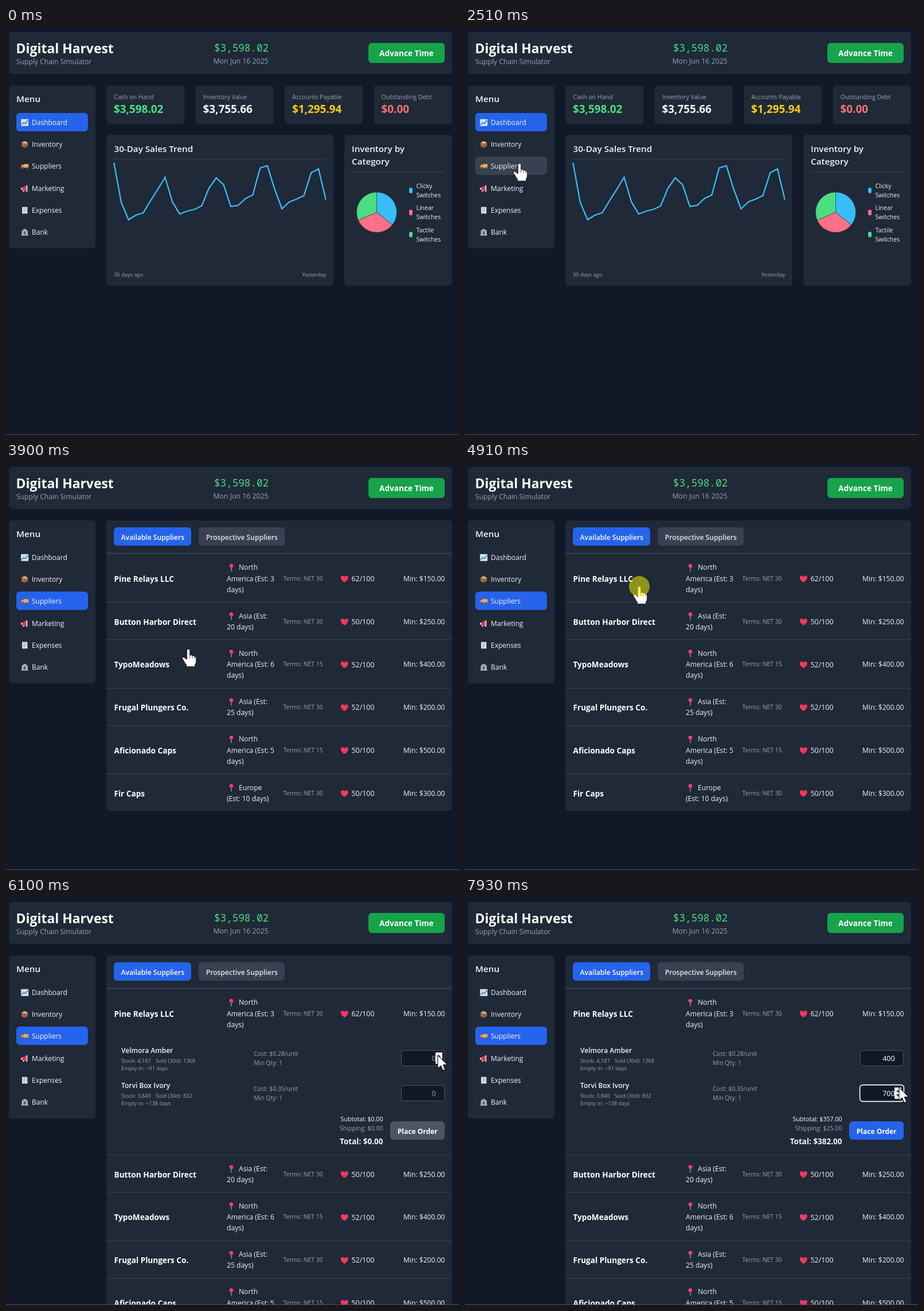
An HTML page for the animation above (7990 ms loop, 790 by 709 pixels).

```html
<!DOCTYPE html>
<html lang="en">
<head>
<meta charset="utf-8">
<title>Supply Chain Simulator</title>
<style>
html, body { margin: 0; width: 100%; height: 100%; overflow: hidden; background: #111827; }
svg { display: block; }
text { font-family: "Open Sans", "Noto Sans", sans-serif; }
.mono { font-family: "Noto Sans Mono", "DejaVu Sans Mono", monospace; }
</style>
</head>
<body>
<svg id="stage" width="790" height="709" viewBox="0 0 790 709"></svg>
<script>
const LOOP = 7990;
const CARD = '#1f2937', LINE = '#374151', GREY = '#9ca3af', LIGHT = '#f3f4f6', WHITE = '#fff', BLUE = '#2563eb',
  SKY = '#38bdf8', ROSE = '#fb7185', GREEN = '#4ade80';

// Markup helpers
const box = (x, y, w, h, fill, r = 6, extra = '') =>
  `<rect x="${x}" y="${y}" width="${w}" height="${h}" rx="${r}" fill="${fill}" ${extra}/>`;
const txt = (x, y, s, size = 12, fill = LIGHT, weight = 400, anchor = 'start', extra = '') =>
  `<text x="${x}" y="${y}" font-size="${size}" fill="${fill}" font-weight="${weight}" text-anchor="${anchor}" ${extra}>${s}</text>`;
const rule = (x1, x2, y, w = 1) => `<path d="M${x1} ${y}H${x2}" stroke="${LINE}" stroke-width="${w}"/>`;
const at = (x, y, s, scale = 1) => `<g transform="translate(${x} ${y}) scale(${scale})">${s}</g>`;
const shape = (d, fill, extra = '') => `<path d="${d}" fill="${fill}" ${extra}/>`;
const stroke = (d, color, w = 1) => `<path d="${d}" fill="none" stroke="${color}" stroke-width="${w}"/>`;

// Icons, centred on 0,0
const icons = [
  box(-7, -6.5, 14, 13, '#dfe9ef', 1) + stroke('M-7 -2H7M-7 2H7M-2 -6V6M3 -6V6', '#a9c3d1', .6) +
    stroke('M-6 4L-2 0L1 2L6 -4', '#2878b5', 1.6),
  shape('M0 -6L6 -3.5V3.5L0 6.5L-6 3.5V-3.5Z', '#a9683f') + shape('M0 -6L6 -3.5L0 -1L-6 -3.5Z', '#d39a6a') +
    shape('M0 -1L6 -3.5V3.5L0 6.5Z', '#8a5233') + stroke('M-3 -4.8L3 -2.2V1', '#ecd0ab', 1.2),
  box(-2, -4, 9, 7, '#f2b035', 1) + shape('M-7 3V0L-5 -3H-2V3Z', '#e8604c') + box(-5.4, -1.8, 2.6, 2, '#bfe3f5', 0) +
    '<circle cx="-4" cy="3.6" r="1.8" fill="#55606e"/><circle cx="4" cy="3.6" r="1.8" fill="#55606e"/>',
  shape('M-6.5 -1.5L4 -6V6L-6.5 2Z', '#e0364f') + shape('M-4 2.5L-1 3.5V6H-3.5Z', '#c3cad3') +
    shape('M3 -6H5V6H3Z', '#f3d4d8') + box(-7, -1.8, 2.5, 4, '#d7dde4', 1),
  shape('M-5 -6.5H5V6.5L3 5.5L1 6.5L-1 5.5L-3 6.5L-5 5.5Z', '#e3e6ea') +
    stroke('M-3 -4H3M-3 -1.5H3M-3 1H3M-3 3.5H1', '#8d97a5', 1),
  shape('M0 -6.5L6.5 -2.5H-6.5Z', '#b8bfc6') + box(-5.5, -2.5, 11, 7, '#8c959d', 0) +
    stroke('M-4 -2V4M4 -2V4', '#d3d8dc', 1.6) + box(-1.5, -.5, 3, 5, '#4c5965', 0) + box(-6.5, 4.3, 13, 2, '#b8bfc6', 0)
];
const pin = stroke('M0 0V7', '#9aa4b2', 1.3) + '<circle cy="-2.5" r="3.5" fill="#f0335b"/><circle cx="-1" cy="-3.6" r="1" fill="#ff8ba3"/>';
const heart = shape('M0 6C-3 4-6.5 1-6.5 -2.3C-6.5 -6.5-1.5 -6.8 0 -3.4C1.5 -6.8 6.5 -6.5 6.5 -2.3C6.5 1 3 4 0 6Z', '#f8355f');

function header() {
  return box(5, 7, 773, 73, CARD) + txt(17.6, 44, 'Digital Harvest', 22.9, WHITE, 700) +
    txt(18, 63, 'Supply Chain Simulator', 12.1, GREY) +
    txt(410.5, 40.5, '$3,598.02', 17.6, GREEN, 400, 'middle', 'class="mono"') +
    txt(409.5, 62, 'Mon Jun 16 2025', 12.3, GREY, 400, 'middle') +
    box(632, 26, 133, 35, '#16a34a') + txt(698.5, 49, 'Advance Time', 13.6, WHITE, 700, 'middle');
}

const itemY = i => Math.floor(148 + i * 38.35);

function sidebar() {
  const names = ['Dashboard', 'Inventory', 'Suppliers', 'Marketing', 'Expenses', 'Bank'];
  return box(5, 100, 151, 284, CARD) + txt(18, 129, 'Menu', 15.2, LIGHT, 600) +
    box(18, 0, 125, 32, LINE, 6, 'id="hover"') + box(18, 0, 125, 32, BLUE, 6, 'id="active"') +
    names.map((n, i) => at(32.7, itemY(i) + 16.7, icons[i], .93) + txt(45, itemY(i) + 21, n)).join('');
}

function pie(cx, cy, r) {
  const point = a => `${cx + r * Math.sin(a * Math.PI / 180)} ${cy - r * Math.cos(a * Math.PI / 180)}`;
  return [[0, 129, SKY], [129, 247, ROSE], [247, 360, GREEN]].map(([a, b, c]) =>
    shape(`M${cx} ${cy}L${point(a)}A${r} ${r} 0 0 1 ${point(b)}Z`, c, `stroke="${CARD}" stroke-width=".5"`)).join('');
}

function dashboard() {
  const cards = [['Cash on Hand', '$3,598.02', GREEN], ['Inventory Value', '$3,755.66', LIGHT],
    ['Accounts Payable', '$1,295.94', '#facc15'], ['Outstanding Debt', '$0.00', '#f87171']];
  const sales = [235, 304, 334, 326, 322, 301, 281, 260, 303, 324, 319, 316, 310, 279, 261, 273, 311, 309, 297, 291,
    244, 240, 281, 315, 303, 298, 292, 252, 245.5, 299];
  const legend = [['Clicky', SKY], ['Linear', ROSE], ['Tactile', GREEN]];
  return cards.map(([label, value, color], i) => at(175 + i * 155.5, 100, box(0, 0, 136.5, 67, CARD) +
      txt(13.3, 24, label, 10.6, GREY) + txt(13, 48.3, value, 18.9, color, 700))).join('') +
    box(175, 186, 396, 263, CARD) + txt(188.5, 216, '30-Day Sales Trend', 15.2, LIGHT, 600) + rule(188, 558, 228.5) +
    stroke('M' + sales.map((y, i) => `${188.3 + i * 12.74} ${y}`).join('L'), SKY, 2.3) +
    txt(188, 433, '30 days ago', 9.3, GREY) + txt(558.5, 433, 'Yesterday', 9.3, GREY, 400, 'end') +
    box(590, 186, 188, 263, CARD) + txt(603, 216, 'Inventory by', 15.2, LIGHT, 600) +
    txt(603, 238, 'Category', 15.2, LIGHT, 600) + rule(603, 765, 250.5) + pie(646.5, 321, 35) +
    legend.map(([n, c], i) => at(703, 283 + i * 38.4, box(0, -5, 6, 10, c, 3) +
      txt(12.5, -4, n, 10.5) + txt(12.5, 12, 'Switches', 10.5))).join('');
}

const suppliers = [
  ['Pine Relays LLC', 'North|America (Est: 3|days)', 30, 62, 150],
  ['Button Harbor Direct', 'Asia (Est:|20 days)', 30, 50, 250],
  ['TypoMeadows', 'North|America (Est: 6|days)', 15, 52, 400],
  ['Frugal Plungers Co.', 'Asia (Est:|25 days)', 30, 52, 200],
  ['Aficionado Caps', 'North|America (Est: 5|days)', 15, 50, 500],
  ['Fir Caps', 'Europe|(Est: 10 days)', 30, 50, 300]
];

function supplierRows() {
  let top = 158;
  return suppliers.map(([name, place, terms, score, min], i) => {
    const lines = place.split('|'), h = lines.length === 3 ? 84.5 : 65, mid = top + h / 2 + .5;
    const lineY = k => mid + 4.8 + (k - (lines.length - 1) / 2) * 19.2;
    const row = (i ? rule(175, 778, Math.floor(top) + .5) : '') + txt(188.5, mid + 6, name, 13.6, WHITE, 700) +
      at(393, lineY(0) - 4.5, pin) + lines.map((s, k) => txt(k ? 385 : 406, lineY(k), s, 12.1)).join('') +
      txt(483.5, mid + 4, `Terms: NET ${terms}`, 10.4, GREY) + at(590.3, mid + 1.2, heart) +
      txt(602.5, mid + 5.3, `${score}/100`, 12.4) + txt(765.5, mid + 5.2, `Min: $${min}.00`, 12.1, LIGHT, 400, 'end');
    top += h;
    return row;
  });
}

function product(i, name, stock, sold, days, cost) {
  return at(0, i * 61, txt(201, 270, name, 12, LIGHT, 600) + txt(201, 287, `Stock: ${stock}`, 9.3, GREY) +
    txt(261, 287, `Sold (30d): ${sold}`, 9.3, GREY) + txt(201, 300, `Empty in: ~${days} days`, 9.3, GREY) +
    txt(432, 275, `Cost: $${cost}/unit`, 10.5, GREY) + txt(432, 291, 'Min Qty: 1', 10.5, GREY) +
    box(689.5, 265.5, 75, 27, '#111827', 4, 'stroke="#4b5563"') +
    box(688.5, 264.5, 77, 29, 'none', 5, `id="ring${i}" stroke="#fff" stroke-width="1.4"`) +
    txt(749.5, 284, '0', 12.4, GREY, 400, 'end', `id="qty${i}"`) +
    `<g id="spin${i}">${box(749, 269, 12, 20, '#ececec', 1)}${shape('M752 277L755 273L758 277ZM752 281L755 285L758 281Z', '#444')}</g>`);
}

function details() {
  return product(0, 'Velmora Amber', '4,187', 1368, 91, '0.28') +
    product(1, 'Torvi Box Ivory', '3,840', 832, 138, '0.35') +
    txt(657.5, 389, '', 10.6, WHITE, 400, 'end', 'id="subtotal"') +
    txt(657.5, 405, '', 10.6, GREY, 400, 'end', 'id="shipping"') +
    txt(657.5, 429, '', 13.5, LIGHT, 700, 'end', 'id="total"') +
    box(670, 389, 95, 32, BLUE, 6, 'id="order"') + txt(717.7, 410.7, 'Place Order', 12, WHITE, 700, 'middle');
}

function supplierPage() {
  const [first, ...others] = supplierRows();
  return box(175, 100, 603, 506, CARD, 6, 'id="panel"') +
    box(188, 112, 135, 32, BLUE) + txt(255.8, 133.5, 'Available Suppliers', 12.1, WHITE, 600, 'middle') +
    box(336, 112, 150, 32, LINE) + txt(411.3, 133.5, 'Prospective Suppliers', 12.1, '#e5e7eb', 600, 'middle') +
    rule(175, 778, 157.5, 2) + first +
    `<svg id="drawer" y="242" width="790" height="0">${at(0, -242, details())}</svg>` +
    `<g id="others">${others.join('')}</g>`;
}

const arrow = shape('M0 0V23L5.3 18L9 26.5L12.8 24.9L9.3 16.6H16.7Z', WHITE, 'stroke="#000"');
const hand = shape('M-2.6 2.5a2.6 2.6 0 0 1 5.2 0V11q2.5-1.5 4.3.8q2.4-1 3.8 1.2q2.8-.4 2.8 3V21q0 4-2 6v3.5H-3.5V27' +
  'Q-6 25-7.5 21L-10.5 16.5Q-10.5 13-7.5 14.5L-2.6 18Z', WHITE, 'stroke="#111" stroke-width=".8"') +
  stroke('M2.7 11V16M6.9 12V16.5M10.7 13.5V17', '#333', .8);

document.getElementById('stage').innerHTML = header() + sidebar() +
  `<g id="dash">${dashboard()}</g><g id="supply">${supplierPage()}</g>` +
  '<rect y="708" width="790" height="1" fill="#4b5563"/>' +
  `<g id="cursor"><g id="arrow">${arrow}</g><g id="hand">${hand}</g><circle id="press" r="18" fill="#ff0" opacity=".5"/></g>`;

// Pointer path: time, x, y
const path = [[320, 722, 698], [1070, 622, 373], [1350, 572, 343], [1880, 179, 232], [2150, 125, 240], [2510, 95, 236],
  [3560, 95, 236], [3900, 318, 324], [4040, 320, 347], [4170, 320, 347], [4910, 304, 215], [5110, 304, 215],
  [5700, 772, 320], [5970, 757, 278], [6100, 753, 274], [6780, 753, 274], [7100, 766, 305], [7380, 757, 330],
  [LOOP, 757, 330]];
const presses = [[3100, 3230], [4840, 4980], [6310, 6710], [7650, 7930]];
const steps = [[6310, 6510, 6580, 6640], [7650, 7720, 7720, 7790, 7790, 7860, 7860]];

function pointer(t) {
  const i = Math.max(1, path.findIndex(p => p[0] > t));
  const [t0, x0, y0] = path[i - 1], [t1, x1, y1] = path[i], k = Math.max(0, (t - t0) / (t1 - t0));
  return [x0 + (x1 - x0) * k, y0 + (y1 - y0) * k];
}

const el = id => document.getElementById(id);
const show = (id, on) => el(id).setAttribute('visibility', on ? 'inherit' : 'hidden');
const set = (id, name, value) => el(id).setAttribute(name, value);
const money = n => '$' + n.toFixed(2);

function render(t) {
  const [x, y] = pointer(t), onSupply = t >= 3230;
  const open = t < 4980 ? 0 : t < 5040 ? 82 : 205;
  const item = x >= 18 && x <= 143 ? [0, 1, 2, 3, 4, 5].find(i => y >= itemY(i) && y <= itemY(i) + 32) : undefined;
  const onRow = onSupply && x >= 175 && x <= 778 && y >= 158 && y < 606 + open && !(y >= 242 && y < 242 + open);
  const pointing = item !== undefined || onRow;

  set('dash', 'display', onSupply ? 'none' : 'inline');
  set('supply', 'display', onSupply ? 'inline' : 'none');
  set('active', 'y', itemY(onSupply ? 2 : 0));
  set('hover', 'y', itemY(item || 0));
  show('hover', item !== undefined && t >= 320);

  set('panel', 'height', 506 + open);
  set('drawer', 'height', open);
  set('others', 'transform', `translate(0 ${open})`);

  const qty = steps.map(s => 100 * s.filter(time => t >= time).length);
  qty.forEach((q, i) => {
    const top = 265 + i * 61;
    el('qty' + i).textContent = q;
    set('qty' + i, 'fill', q ? WHITE : GREY);
    show('ring' + i, i ? t >= 7650 : t >= 6310 && t < 7650);
    show('spin' + i, x >= 689 && x <= 765 && y >= top && y <= top + 28);
  });
  const sub = qty[0] * .28 + qty[1] * .35, ship = sub ? 25 : 0;
  el('subtotal').textContent = 'Subtotal: ' + money(sub);
  el('shipping').textContent = 'Shipping: ' + money(ship);
  el('total').textContent = 'Total: ' + money(sub + ship);
  set('order', 'fill', sub >= 150 ? BLUE : '#4b5563');

  set('cursor', 'transform', `translate(${x} ${y})`);
  show('cursor', t >= 320);
  show('hand', pointing);
  show('arrow', !pointing);
  show('press', presses.some(([a, b]) => t >= a && t < b));
}

const start = performance.now();
function tick(now) {
  render(Math.max(0, now - start) % LOOP);
  requestAnimationFrame(tick);
}
render(0);
requestAnimationFrame(tick);
</script>
</body>
</html>
```
